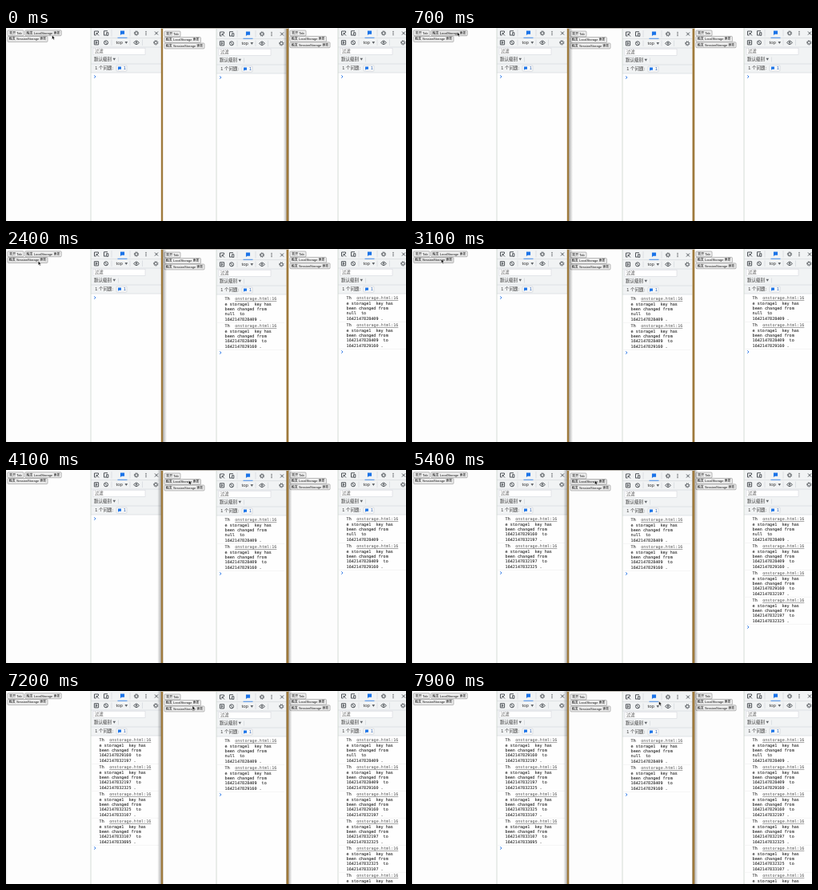
Write an HTML page that moves like this. It is 500 px wide and 242 px high and loops after 8000 ms.

```html
<!DOCTYPE html>
<html lang="zh">
<head>
<meta charset="utf-8">
<style>
  html, body { margin: 0; width: 100%; height: 100%; overflow: hidden; background: #fdfdfd; }
  svg { display: block; width: 500px; height: 242px; }
  text { font-family: "Liberation Sans", "Noto Sans CJK SC", "Noto Sans CJK", sans-serif; fill: #333; white-space: pre; }
  .log text { font: 5.1px "DejaVu Sans Mono", monospace; fill: #222; stroke: #222; stroke-width: .06; }
  .log .link { fill: #555; stroke: none; text-decoration: underline; }
  .icon { fill: none; stroke: #50555a; stroke-width: 1; }
  .rule { fill: none; stroke: #d0d4d8; stroke-width: .6; }
  .btn text { font-size: 4px; fill: #111; }
  .btn rect { stroke: #8a8a8a; stroke-width: .6; }
</style>
</head>
<body>
<svg id="stage" viewBox="0 0 500 242"></svg>
<script>
const LOOP = 8000, STEP = 100, PITCH = 34;
const stage = document.getElementById('stage');

// Windows: edges, devtools origin, button rectangles [x, y, width]
const wins = [
  { l: 0, r: 194, x: 106, y: 0, btns: [[2, 2.8, 20], [23.8, 2.8, 45.4], [2, 10.5, 50]] },
  { l: 196.2, r: 350.5, x: 263, y: 1, btns: [[198, 4, 20], [198, 11.5, 45.4], [198, 19, 50]] },
  { l: 353.5, r: 500, x: 415, y: 0, btns: [[355, 3, 20], [355, 10.4, 45.4], [355, 17.8, 50]] }
];
const labels = ['新开 Tab', '触发 LocalStorage 更新', '触发 SessionStorage 更新'];

// Stored values, and when each change after the first one arrives
const values = ['null', ...[28409, 29160, 32197, 32325, 33107, 33695].map(v => '16421478' + v)];
const arrivals = [800, 1600, 4600, 4700, 5500, 6100];
const hears = [i => i > 1, i => i < 2, () => true];

const presses = [700, 3100, 4600, 5400, 6000, 7200, 7400, 7600];
const path = [
  [0, 57.5, 9], [500, 56.5, 5], [1800, 56.5, 5], [2200, 44, 17.5], [2600, 36.5, 12.5],
  [3300, 36.5, 12.5], [3600, 240, 21], [3700, 240, 21], [4100, 228.5, 13],
  [6300, 228.5, 13], [6600, 235, 22.5], [7000, 233, 18.5], [7800, 233, 18.5], [7900, 308.5, 12.8], [LOOP, 308.5, 12.8]
];

const text = (x, y, s, size, extra = '') => `<text x="${x}" y="${y}" font-size="${size}" ${extra}>${s}</text>`;
const rect = (x, y, w, h, fill, extra = '') => `<rect x="${x}" y="${y}" width="${w}" height="${h}" fill="${fill}" ${extra}/>`;
const icon = (x, y, d, extra = '') => `<path class="icon" transform="translate(${x} ${y})" d="${d}" ${extra}/>`;
const circle = r => `M${-r} 0a${r} ${r} 0 1 0 ${2 * r} 0a${r} ${r} 0 1 0 ${-2 * r} 0`;
const bubble = (x, y, s) => `<path transform="translate(${x} ${y}) scale(${s})" fill="#1a73e8" d="M-3-3H3V2H-1L-3 3.6Z"/>`;
const arrow = (x, y) => `<path fill="#5f6368" d="M${x} ${y}h3.6l-1.8 3z"/>`;
const gear = (x, y) => icon(x, y, circle(1.8)) + icon(x, y, circle(2.7), 'stroke-dasharray="1.06"');

function toolbar(w) {
  return rect(0, -1, w, 57, '#f1f3f4') +
    `<path class="rule" d="M0 12.6H${w}M0 24H${w}M0 45H${w}M0 56H${w}M26 2V10.5M49 2V10.5M26 14.5V22M49 14.5V22M64.5 14.5V22M34.5 36.5V42.5"/>` +
    icon(7, 6.5, 'M-.5 2.5H-2.5V-2.5H2.5V-.5M3 3L0 0M0 2V0H2') +
    icon(19, 6.5, 'M-2.5 2.5V-2.8H2M-2.8 2.5H0M.6-.8H2.8V2.8H.6Z') +
    bubble(39.5, 6, .85) + rect(33.5, 11.8, 12, .8, '#1a73e8') +
    gear(57, 6.5) +
    [-2.1, 0, 2.1].map(d => `<circle cx="69" cy="${6.5 + d}" r=".75" fill="#5f6368"/>`).join('') +
    icon(82, 6.5, 'M-2-2L2 2M2-2L-2 2') +
    icon(7, 18.3, 'M-2.6-2.6H2.6V2.6H-2.6ZM-.7-1.4L1.2 0L-.7 1.4Z') +
    icon(19, 18.3, circle(2.5) + 'M-1.7-1.7L1.7 1.7') +
    text(31.5, 20.2, 'top', 6) + arrow(42.5, 17) +
    icon(57, 18.3, 'M-3.4 0Q0-4.6 3.4 0Q0 4.6-3.4 0Z' + circle(.9)) +
    gear(81.3, 18.3) +
    rect(3, 25.2, 65, 8.4, '#fff', 'stroke="#d5d8dc" stroke-width=".6"') +
    text(5, 31.1, '过滤', 5.3, 'style="fill:#555"') +
    text(4, 41.1, '默认级别', 5.5) + arrow(27.5, 37.7) +
    text(5.3, 52.4, '1 个问题:', 5.5) +
    rect(32, 46.8, 13, 7.4, '#f7f8f9', 'rx="1" stroke="#cdd1d6" stroke-width=".6"') +
    bubble(36, 50.4, .65) + text(41, 52.3, '1', 5, 'style="fill:#1a56b0"');
}

function message(i, row) {
  const y = 63.4 + row * PITCH;
  const lines = ['Th', 'e storage1  key has', 'been changed from', values[i] + '  to', values[i + 1] + ' .'];
  return `<g class="msg" data-at="${arrivals[i]}">` +
    lines.map((s, k) => text(10.6, y + k * 6.3, s, 5.1)).join('') +
    text(75.3, y, 'onstorage.html:16', 5.1, 'class="link" text-anchor="end"') +
    `<path d="M0 ${y + 28}H85" stroke="#f0f0f0" stroke-width=".6"/></g>`;
}

function devtools(win, n) {
  const w = win.r - win.x;
  const shown = arrivals.map((_, i) => i).filter(hears[n]);
  return `<g transform="translate(${win.x} ${win.y})">` + rect(0, -1, w, 243, '#fefefe') + toolbar(w) +
    `<path d="M0-1V242" stroke="#cbd3cc" stroke-width=".8"/>` +
    `<g class="log">${shown.map(message).join('')}<path class="prompt" fill="none" stroke="#3b82e8" stroke-width="1" d="M4.2 59.3L6 61L4.2 62.7"/></g></g>`;
}

const button = ([x, y, w], i) => `<g class="btn">` + rect(x, y, w, 6.9, '#efefef', 'rx="1"') +
  text(x + w / 2, y + 4.9, labels[i], 4, 'text-anchor="middle"') + '</g>';

const fade = (id, a, b) => `<linearGradient id="${id}"><stop stop-color="#000" stop-opacity="${a}"/><stop offset="1" stop-color="#000" stop-opacity="${b}"/></linearGradient>`;

stage.innerHTML = `<defs>${fade('rise', 0, .45)}${fade('fall', .45, 0)}</defs>` +
  rect(0, 0, 500, 242, '#fdfdfd') + rect(0, 0, 1.2, 242, '#ececec') +
  wins.map((w, n) => `<g class="win">${devtools(w, n)}${w.btns.map(button).join('')}</g>`).join('') +
  wins.map(w => `<g class="shade">${rect(w.l - 7, 0, 7, 242, 'url(#rise)')}${rect(w.r, 0, 7, 242, 'url(#fall)')}</g>`).join('') +
  rect(193.8, 0, 2.4, 242, '#9f7a3c') + rect(350.5, 0, 2.8, 242, '#9f7a3c') +
  rect(194, 0, 159, 1, '#bdb9b2') +
  '<path id="cursor" d="M0 0V5.2L1.2 4.2L2.1 6.1L3 5.7L2.2 3.8H3.7Z" fill="#000" stroke="#fff" stroke-width=".5"/>';

const all = (sel, root = stage) => [...root.querySelectorAll(sel)];
const panes = all('.win').map(el => ({ msgs: all('.msg', el), prompt: el.querySelector('.prompt') }));
const buttons = all('.btn rect'), spots = wins.flatMap(w => w.btns), shades = all('.shade');
const cursor = document.getElementById('cursor');

function pointAt(t) {
  const k = path.findIndex(p => p[0] > t);
  const [t0, x0, y0] = path[k - 1], [t1, x1, y1] = path[k];
  const u = (t - t0) / (t1 - t0);
  return [x0 + (x1 - x0) * u, y0 + (y1 - y0) * u];
}

function draw(now) {
  const t = Math.floor(now % LOOP / STEP) * STEP;
  const [cx, cy] = pointAt(t);
  cursor.setAttribute('transform', `translate(${cx} ${cy})`);

  for (const { msgs, prompt } of panes) {
    let count = 0;
    for (const m of msgs) {
      const on = t >= +m.dataset.at;
      m.style.display = on ? '' : 'none';
      count += on;
    }
    prompt.setAttribute('transform', `translate(0 ${count * PITCH})`);
  }

  const down = presses.includes(t);
  buttons.forEach((b, i) => {
    const [x, y, w] = spots[i];
    const over = cx >= x && cx <= x + w && cy >= y && cy <= y + 6.9;
    b.setAttribute('fill', over ? (down ? '#e4e4e4' : '#e9e9e9') : '#efefef');
  });

  const active = t < 300 ? 2 : t < 3800 ? 0 : 1;
  shades.forEach((s, n) => s.style.display = n === active ? '' : 'none');
}

(function tick() {
  draw(performance.now());
  requestAnimationFrame(tick);
})();
</script>
</body>
</html>
```
